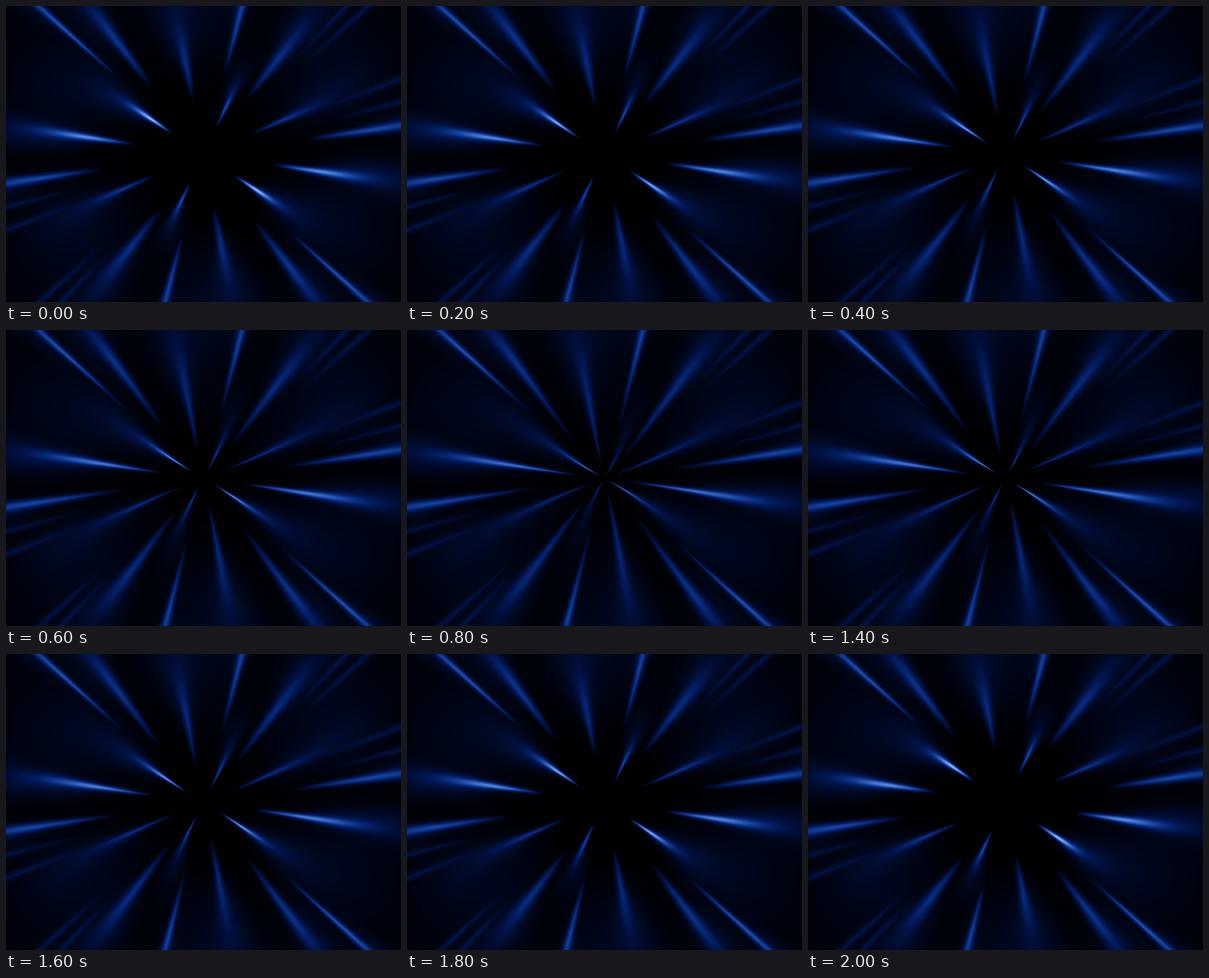
Animation, 500 px wide and 375 px high, one loop 2.1 s. Source, as an HTML page with a canvas:

```html
<!DOCTYPE html>
<html lang="en">
<head>
<meta charset="utf-8">
<title>Blue light tunnel</title>
<style>
html, body { margin: 0; width: 100%; height: 100%; overflow: hidden; background: #000; }
canvas { display: block; }
</style>
</head>
<body>
<canvas width="500" height="375"></canvas>
<script>
const W = 500, H = 375, CX = 250, CY = 188, DEG = Math.PI / 180;
const ctx = document.querySelector('canvas').getContext('2d');
const img = ctx.createImageData(W, H);
const out = new Uint32Array(img.data.buffer);

const smooth = (a, b, x) => {
  x = Math.min(1, Math.max(0, (x - a) / (b - a)));
  return x * x * (3 - 2 * x);
};

// Polar map of the light; it repeats after half a turn, so 180 degrees are enough
const ANGLES = 1800, RADII = 640;
const light = new Float32Array(ANGLES * RADII);

// Faint haze in fans 60 degrees apart
for (let i = 0; i < ANGLES; i++) {
  const fan = .5 + .5 * Math.cos(6 * (i / 10 - 33) * DEG);
  for (let j = 0; j < RADII; j++) {
    const s = j / 2;
    light[i * RADII + j] = (.03 + .08 * fan) * smooth(50, 190, s) * (1 - .65 * smooth(190, 310, s));
  }
}

// A ray starts sharp at its inner radius, peaks further out and then spreads and fades
function addRay(angle, inner, width, power) {
  const peak = inner * 1.6, fall = peak * .45;
  for (let j = Math.ceil(inner * 2); j < RADII; j++) {
    const x = Math.min(1, (j / 2 - inner) / (peak - inner));
    const rise = x * (2 - x);
    const past = Math.max(0, j / 2 - peak) / fall;
    const gain = power * rise * Math.exp(-past * past);
    const sigma = width * (.6 + .4 * rise + .25 * past);
    const from = Math.floor((angle - 4 * sigma) * 10), to = (angle + 4 * sigma) * 10;
    for (let i = from; i < to; i++) {
      const d = (i / 10 - angle) / sigma;
      light[(i + ANGLES) % ANGLES * RADII + j] += gain * Math.exp(-d * d / 2);
    }
  }
}

// angle in degrees, inner radius, angular width, strength
const rays = [
  [8.3, 130, .95, .56],
  [23.3, 64, 1.2, .46],
  [52, 88, 1.7, .42],
  [64.6, 38, 1.6, .6],
  [75.4, 105, 1, .5],
  [101, 68, 1.8, .4],
  [127.4, 105, 1.4, .46],
  [138, 145, .6, .58],
  [146, 47, 1.5, .92],
  [171.6, 88, 1.15, .78]
];
for (const [angle, inner, width, power] of rays) {
  addRay(angle, inner, width, power);
  addRay(angle + 1.5, inner * 1.5, width * 3, power * .22);
}
for (const angle of [15, 21, 42, 46]) addRay(angle, 170, .6, .2);

const palette = Uint32Array.from({ length: 256 }, (_, i) => {
  const v = i / 255;
  const r = 165 * v ** 4, g = 60 * v + 130 * v ** 3, b = 255 * v;
  return (255 << 24 | b << 16 | g << 8 | r) >>> 0;
});

// level 0: wide dark hole; level 10: rays drawn in to the centre
function draw(level) {
  for (let p = 0; p < W * H; p++) {
    const x = p % W + .5 - CX, y = Math.floor(p / W) + .5 - CY;
    const d = Math.min(1, Math.hypot(x / CX, y / CY));
    const zoom = Math.sin(d * Math.PI / 2) ** (-.08 * level);
    const sx = x * zoom, sy = y * zoom * (1 + .03 * level * (1 - d) ** 3);
    const i = Math.round((Math.atan2(-sy, sx) / DEG + 180) * 10) % ANGLES;
    const j = Math.min(RADII - 1, Math.round(Math.hypot(sx, sy) * 2));
    const v = light[i * RADII + j] * (1 - .025 * level * (1 - d));
    out[p] = palette[Math.min(255, Math.round(v * 255))];
  }
  ctx.putImageData(img, 0, 0);
}

let shown = -1;
const start = performance.now();
function tick() {
  const step = Math.floor((performance.now() - start) % 2100 / 100);
  if (step !== shown) {
    shown = step;
    draw(step <= 10 ? step : (20 - step) * 10 / 9);
  }
  requestAnimationFrame(tick);
}
tick();
</script>
</body>
</html>
```
